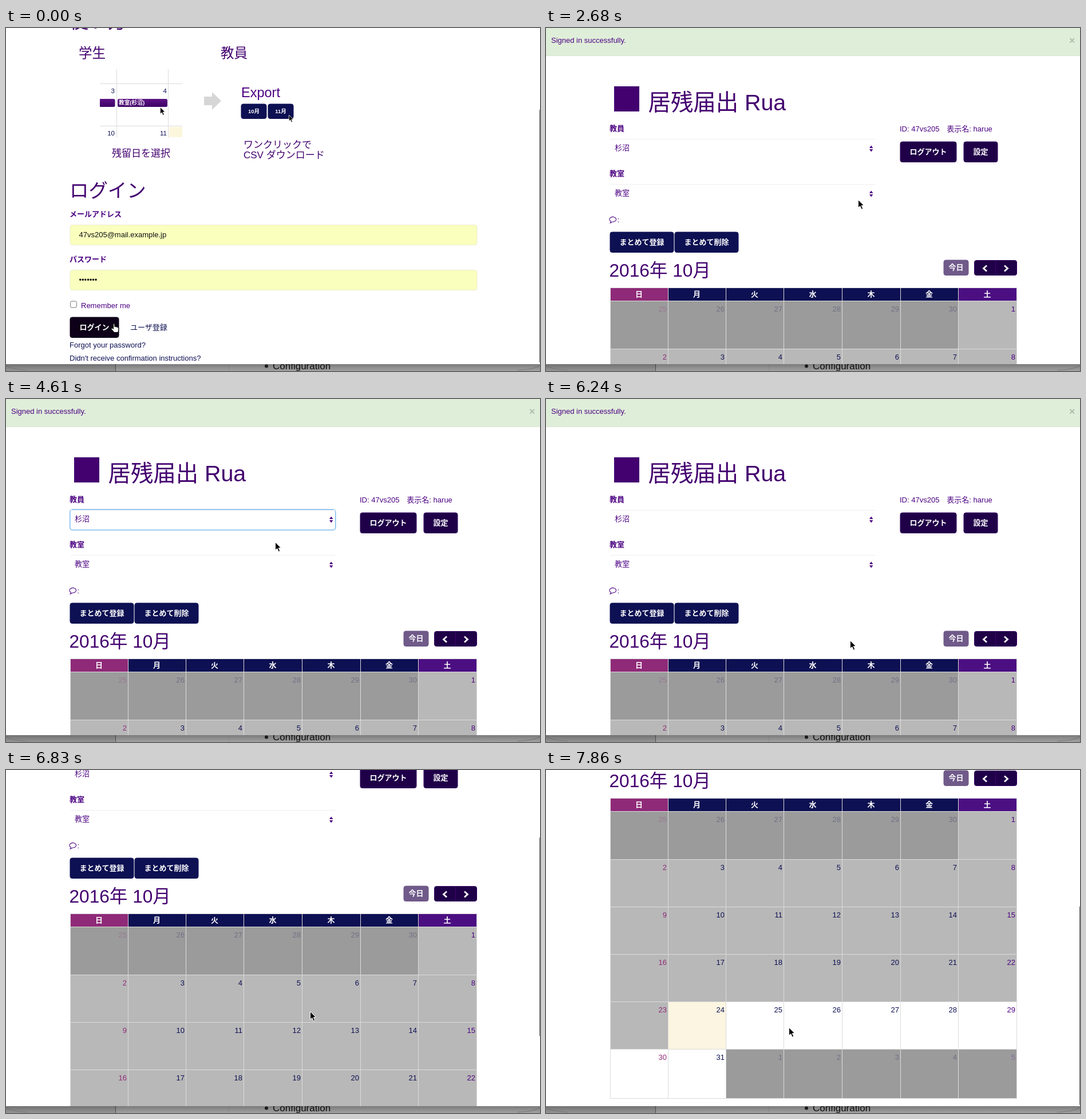
Recreate the animation shown at these times as an HTML page. Size 933 by 600 pixels, loop 8000 ms.

```html
<!DOCTYPE html>
<html lang="ja">
<head>
<meta charset="utf-8">
<title>居残届出</title>
<style>
  html, body { margin: 0; width: 100%; height: 100%; overflow: hidden; background: #fff; }
  svg { display: block; width: 933px; height: 600px; }
  text { font-family: "Liberation Sans", "Noto Sans CJK JP", "Noto Sans CJK", sans-serif; font-size: 13px; fill: #4b0082; white-space: pre; }
  .b { font-weight: 700; }
  .l { font-weight: 300; fill: #43006f; }
  .w { font-weight: 700; fill: #fff; }
  .navy { fill: #0d1052; }
  .ink { fill: #111; }
  .sun { fill: #8f2a78; }
  .dim { opacity: .3; }
  .line { fill: none; stroke: #dcdcdc; shape-rendering: crispEdges; }
</style>
</head>
<body>
<svg id="stage" viewBox="0 0 933 600" xmlns="http://www.w3.org/2000/svg"></svg>
<script>
const NAVY = '#0d1052', DEEP = '#1f0048', INDIGO = '#4b0082', PALE = '#6f5a89';

// y is the middle of the glyphs; purely Japanese text sits a little higher
const drop = str => /^[\u3040-\u9fff()]+$/.test(str) ? .305 : .355;
const text = (x, y, str, cls = '', size = 13, anchor = 'start') =>
  `<text x="${x}" y="${y + size * drop(str)}" class="${cls}" text-anchor="${anchor}" style="font-size:${size}px">${str}</text>`;
const rect = (x, y, w, h, fill, r = 0, extra = '') =>
  `<rect x="${x}" y="${y}" width="${w}" height="${h}" rx="${r}" fill="${fill}" ${extra}/>`;
const path = (d, attrs) => `<path d="${d}" ${attrs}/>`;
const group = (id, body, attrs = '') => `<g id="${id}" ${attrs}>${body}</g>`;
const button = (x, y, w, h, label, fill, size = 13, edge = fill) =>
  rect(x, y, w, h - .5, fill, 3.5, `stroke="${edge}"`) +
  text(x + w / 2, y + h / 2, label, 'w', size, 'middle');
const arrow = (x, y, k = 1) => path(
  'M.5 .5V14.6L3.8 11.5L6.3 17.2L8.7 16.1L6.3 10.6H10.5Z',
  `transform="translate(${x} ${y}) scale(${k})" fill="#000" stroke="#fff" stroke-width="1" stroke-linejoin="round"`);

function backdrop() {
  return rect(0, 580, 933, 20, '#a8a8a8') +
    rect(0, 580, 191, 20, '#9b9b9b') +
    rect(191, 588, 1, 12, '#555') +
    path('M389.5 588V600', 'stroke="#8e8e8e" stroke-dasharray="1 1"') +
    path('M0 590.500Q10 597.500 38 598.500M933 590.500Q923 597.500 893 598.500', 'fill="none" stroke="#858585"') +
    '<circle cx="455" cy="591.500" r="3" fill="#222"/>' +
    text(466, 590.5, 'Configuration', 'ink', 17) +
    rect(0, 588, 933, 12, 'url(#shade)');
}

function loginPage() {
  const field = y => rect(112, y + .5, 711, 35, '#faffbd', 4, 'stroke="#ececd2"');
  return rect(0, 0, 933, 588, '#fff') +
    text(111, -10, '使い方', 'l', 33.4) +
    text(127, 45, '学生', 'l', 23.5) + text(375, 45, '教員', 'l', 23.5) +
    rect(285, 173, 23, 18, '#fcf6dd') +
    path('M193 72V192M283.500 72V192M164 97.500H308M164 171.500H308', 'class="line"') +
    text(190, 110, '3', 'navy', 11.5, 'end') + text(281, 110, '4', 'navy', 11.5, 'end') +
    text(190, 184, '10', 'navy', 11.5, 'end') + text(281, 184, '11', 'navy', 11.5, 'end') +
    path('M164 124H188Q190.500 124 190.500 126.500V135.500Q190.500 138 188 138H164Z', 'fill="url(#event)"') +
    rect(195, 124, 87, 14, 'url(#event)', 2.5) +
    text(197, 131, '教室(杉沼)', 'w', 9.7) + arrow(269, 138, .85) +
    text(185, 220, '残留日を選択', 'l', 17) +
    path('M346 120H360V112L376 127.500L360 143V135H346Z', 'fill="#d6d6d6"') +
    text(411, 113, 'Export', '', 23.5) +
    button(411, 133, 44, 26, '10月', NAVY, 9.5) + button(458, 133, 44, 26, '11月', NAVY, 9.5) +
    arrow(494, 152, .75) +
    text(415, 205, 'ワンクリックで', 'l', 17) + text(415, 222, 'CSV ダウンロード', 'l', 17) +
    text(111, 286, 'ログイン', 'l', 33.4) +
    text(111, 326, 'メールアドレス', 'b') + field(344) +
    text(127.5, 361.5, '47vs205@mail.example.jp', 'ink') +
    text(111, 405, 'パスワード', 'b') + field(423) +
    text(127.5, 440, '•••••••', 'ink') +
    rect(112.5, 478, 11, 11, '#fff', 2.5, 'stroke="#777"') +
    text(131, 485, 'Remember me') +
    group('ready', button(112, 506, 85, 36, 'ログイン', '#0d0018')) +
    group('busy', button(112, 506, 85, 36, 'ログイン', PALE)) +
    text(217, 524, 'ユーザ登録', 'navy') +
    text(111, 554, 'Forgot your password?', 'navy') +
    text(111, 577, "Didn't receive confirmation instructions?", 'navy') +
    group('bar1', rect(932, 143, 1, 442, '#5c5c5c'));
}

const select = (y, label) =>
  path(`M113 ${y + .5}H575`, 'stroke="#eeeef2"') + text(120, y + 16, label) +
  path(`M565 ${y + 16}L568.200 ${y + 11.5}L571.400 ${y + 16}ZM565 ${y + 18}L568.200 ${y + 22.5}L571.400 ${y + 18}Z`, `fill="${INDIGO}"`);

function calendar() {
  const cols = [112, 213, 314, 415, 517, 619, 720, 822];
  const rows = [477, 561, 644, 727, 810, 893, 979];
  const ink = c => c === 0 ? 'sun' : c === 6 ? '' : 'navy';
  let out = '';
  [...'日月火水木金土'].forEach((day, c) => {
    const w = cols[c + 1] - cols[c];
    const fill = c === 0 ? '#8f2a78' : c === 6 ? '#4b0f82' : NAVY;
    out += rect(cols[c], 454, w, 23, fill) + text(cols[c] + w / 2, 466, day, 'w', 13, 'middle');
    for (let r = 0; r < 6; r++) {
      const n = r * 7 + c - 5;
      const other = n < 1 || n > 31;
      const label = n < 1 ? n + 30 : n > 31 ? n - 31 : n;
      const cell = other ? '#9b9b9b' : n < 24 ? '#b8b8b8' : n === 24 ? '#fcf5e1' : '#fff';
      out += rect(cols[c], rows[r], w, rows[r + 1] - rows[r], cell) +
        text(cols[c + 1] - 2, rows[r] + 14.5, label, ink(c) + (other ? ' dim' : ''), 13, 'end');
    }
  });
  const lines = cols.map(x => `M${x + .5} 454V980`).join('') +
    [454, ...rows].map(y => `M112 ${y + .5}H823`).join('');
  return out + path(lines, 'class="line"');
}

function mainPage() {
  return rect(0, 0, 933, 48, '#dfeed9') + rect(0, 48, 933, 1, '#d6e6c8') +
    text(9, 21, 'Signed in successfully.') +
    path('M915.500 18L923 25.500M923 18L915.500 25.500', 'stroke="#b0bcab" stroke-width="1.800"') +
    rect(119, 102, 44, 44, '#43006f') +
    text(178.5, 130.5, '居残届出 Rua', 'l', 39.4) +
    text(111, 176, '教員', 'b') + group('focus',
      rect(112, 193.5, 463.5, 35.5, '#fff', 4, 'stroke="#66afe9" filter="url(#glow)"')) +
    select(194, '杉沼') +
    text(111, 255, '教室', 'b') + select(273, '教室') +
    path('M113.500 338.300A5.800 4.300 0 1 1 116 339Q114.500 340.800 112.300 341Q113.500 339.800 113.500 338.300Z',
      `fill="none" stroke="${INDIGO}" stroke-width="1.100"`) +
    text(124.5, 335, ':') +
    text(618, 176, 'ID: 47vs205　表示名: harue') +
    button(619, 199, 98, 36, 'ログアウト', DEEP, 13, '#35005f') +
    button(730, 199, 59, 36, '設定', DEEP, 13, '#35005f') +
    button(112, 357, 111, 36, 'まとめて登録', NAVY) + button(225, 357, 111, 36, 'まとめて削除', NAVY) +
    text(110.5, 424, '2016年 10月', 'l', 31.6) +
    button(695, 406, 43, 27, '今日', PALE) +
    rect(748.5, 406.5, 74, 26, DEEP, 3.5, 'stroke="#35005f"') + rect(785, 407, 1, 25, '#43006f') +
    path('M770 415.500L764.500 420.500L770 425.500M801 415.500L806.500 420.500L801 425.500',
      'fill="none" stroke="#fff" stroke-width="2.800"') +
    calendar();
}

function menu() {
  const mark = (id, y) => group(id, rect(101, y, 465, 18, '#03427f'));
  return rect(101, 196, 465, 44, '#f3f3f3', 4, 'filter="url(#drop)"') +
    mark('pick1', 200) + mark('pick2', 218) +
    group('tick', path('M107.500 209.500L110 212.500L114.500 205.500', 'fill="none" stroke="currentColor" stroke-width="1.400"')) +
    text(121.5, 208.5, '<tspan id="name1">杉沼</tspan>', '', 12) +
    text(121.5, 226.5, '<tspan id="name2">ダミー講師</tspan>', '', 12);
}

const hand = path(
  'M4.500 9V2Q5.500 .3 6.800 2V6.500Q8.200 5.300 9.200 7Q10.500 6 11.500 7.700Q13.300 7 13.700 9V12Q13.500 14 12.500 16.500H6Q3.500 13.500 1 10.500Q.8 8.500 3 9L4.500 10.500Z',
  'fill="#fff" stroke="#000" stroke-width="1"');
const sign = (color, width) => path('M2.200 23A7.800 7.800 0 1 1 17.800 23A7.800 7.800 0 1 1 2.200 23M4.500 17.500L15.500 28.500',
  `fill="none" stroke="${color}" stroke-width="${width}"`);
const ban = sign('#666', 3.4) + sign('#fff', 1.8);

document.getElementById('stage').innerHTML = `<defs>
  <linearGradient id="shade" x2="0" y2="1"><stop stop-color="#000" stop-opacity=".27"/><stop offset="1" stop-color="#000" stop-opacity=".04"/></linearGradient>
  <linearGradient id="event" x2="0" y2="1"><stop stop-color="#5d1585"/><stop offset="1" stop-color="#3d0065"/></linearGradient>
  <filter id="glow" x="-5%" y="-30%" width="110%" height="160%"><feDropShadow dx="0" dy="0" stdDeviation="1.800" flood-color="#66afe9" flood-opacity=".6"/></filter>
  <filter id="drop" x="-5%" y="-30%" width="110%" height="180%"><feDropShadow dx="0" dy="4" stdDeviation="3.500" flood-opacity=".38"/></filter>
  <clipPath id="pane"><path d="M0 0H933V588H0Z"/></clipPath></defs>` +
  backdrop() +
  `<g clip-path="url(#pane)">` +
  group('login', loginPage()) +
  group('main', rect(0, 0, 933, 588, '#fff') + group('scroll', mainPage()) +
    group('bar2', rect(932, 0, 1, 347, '#5c5c5c')) + group('menu', menu())) +
  '</g>' +
  group('cursor', group('arrow', arrow(0, 0)) + group('hand', hand) + group('ban', ban));

// Held keyframes: { start in ms: value }
const LOOP = 8000;
let css = '';
function hold(id, prop, values) {
  const frames = Object.entries(values).map(([ms, v]) => `${ms / LOOP * 100}%{${prop}:${v}}`).join('');
  css += `@keyframes ${id}{${frames}}#${id}{animation:${id} ${LOOP}ms step-end infinite}`;
}
const at = (x, y) => `translate(${x}px,${y}px)`;

hold('login', 'opacity', { 0: 1, 1340: 0 });
hold('main', 'opacity', { 0: 0, 1340: 1 });
hold('bar1', 'opacity', { 0: 1, 300: .5, 450: 0 });
hold('ready', 'opacity', { 0: 1, 750: 0 });
hold('busy', 'opacity', { 0: 0, 750: 1 });
hold('hand', 'opacity', { 0: 1, 750: 0 });
hold('arrow', 'opacity', { 0: 0, 750: 1 });
hold('ban', 'opacity', { 0: 0, 750: 1, 1940: 0 });
hold('cursor', 'transform', {
  0: at(183, 516), 750: at(186, 514), 1940: at(430, 400), 2080: at(573, 335),
  2680: at(545, 300), 2820: at(468, 240), 2970: at(433, 218),
  4010: at(434, 212), 4160: at(436, 206), 4600: at(470, 250), 4750: at(545, 345), 4900: at(574, 380),
  6090: at(548, 408), 6240: at(531, 422),
  7420: at(512, 427), 7570: at(475, 437), 7720: at(438, 447), 7860: at(424, 450)
});
hold('menu', 'opacity', { 0: 0, 3270: 1, 4460: .5, 4600: 0 });
hold('pick1', 'opacity', { 0: 0, 3270: 1, 3420: 0, 4010: 1 });
hold('pick2', 'opacity', { 0: 0, 3420: 1, 4010: 0 });
hold('name1', 'fill', { 0: '#111', 3270: '#fff', 3420: '#111', 4010: '#fff' });
hold('tick', 'color', { 0: '#111', 3270: '#fff', 3420: '#111', 4010: '#fff' });
hold('name2', 'fill', { 0: '#111', 3420: '#fff', 4010: '#111' });
hold('focus', 'opacity', { 0: 0, 3270: 1, 5200: .5, 5350: 0 });

const offsets = { 0: 0, 6530: 40, 6680: 150, 6830: 203, 7130: 330, 7280: 405 };
const moved = fn => Object.fromEntries(Object.entries(offsets).map(([ms, s]) => [ms, fn(s)]));
hold('scroll', 'transform', moved(s => at(0, -s)));
hold('bar2', 'transform', moved(s => s ? at(0, s * .597 - 3) : at(9, 0)));

document.head.appendChild(document.createElement('style')).textContent = css;
</script>
</body>
</html>
```
